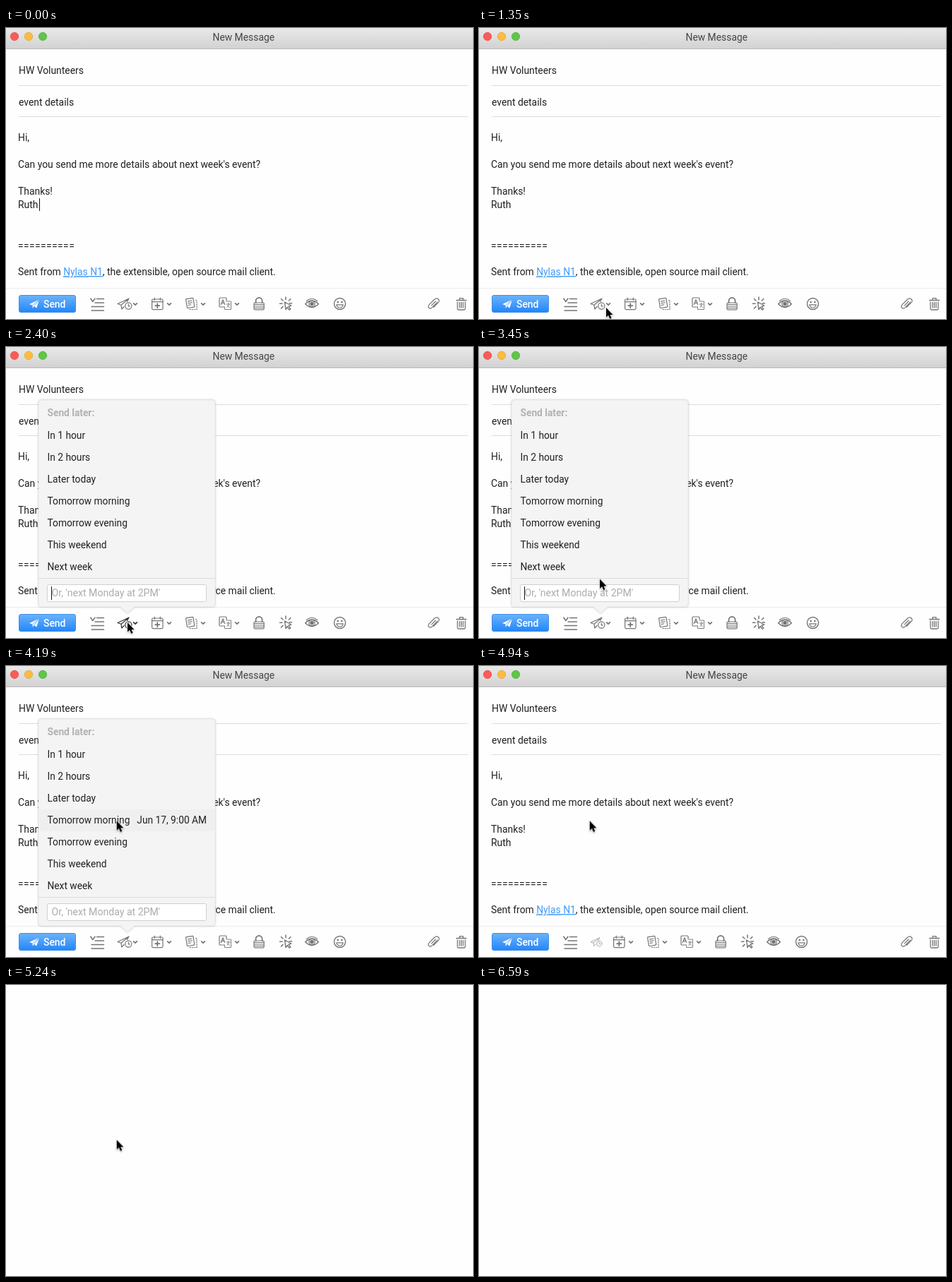
Recreate the animation shown at these times as an HTML page. Size 661 px wide and 412 px high, loop 7190 ms.

```html
<!DOCTYPE html>
<html lang="en">
<head>
<meta charset="utf-8">
<title>New Message</title>
<style>
  html, body { margin: 0; width: 100%; height: 100%; overflow: hidden; background: #fefefe; }
  svg { display: block; width: 661px; height: 412px; }
  text { font: 13.88px Roboto, "Open Sans", sans-serif; fill: #231f20; white-space: pre; }
  .rule { stroke: #dcdcdc; }
  .caret { stroke: #111; }
  .icon { color: #747474; fill: none; stroke: currentColor; stroke-width: 1.2; stroke-linecap: round; stroke-linejoin: round; }
  .solid { fill: currentColor; stroke: none; }
  .title { fill: #464646; text-anchor: middle; }
  .send { fill: #fff; font-weight: 500; }
  .link { fill: #419bf9; text-decoration: underline; text-decoration-color: #8fbfee; }
  .marks { letter-spacing: .4px; }
  #menu text { font-size: 13.75px; }
  #menu .heading { fill: #b2b2b2; font-weight: 700; }
  .hint { fill: #acacac; }
  .date { text-anchor: end; }
  .panel { filter: drop-shadow(0 .5px 1.5px rgba(0, 0, 0, .2)); }
  #pointer { filter: drop-shadow(0 1px 1px rgba(0, 0, 0, .3)); }

  /* Every part shares one 7190 ms clock and changes in hard steps. */
  .anim { animation: 7190ms step-end infinite; }
  #window { animation-name: window; }
  #bodyCaret { animation-name: bodyCaret; }
  #later { animation-name: later; }
  #laterSmall { animation-name: laterSmall; }
  #tools { animation-name: tools; }
  #menu { animation-name: menu; }
  #inputCaret { animation-name: inputCaret; }
  #weekend { animation-name: weekend; }
  #morning { animation-name: morning; }
  #veil { animation-name: veil; }
  #pointer { animation-name: pointer; }

  @keyframes window { 0% { opacity: 1 } 72.87%, 100% { opacity: 0 } }
  @keyframes bodyCaret {
    0%, 12.51%, 25.03% { opacity: 1 }
    4.17%, 18.77%, 29.2%, 100% { opacity: 0 }
  }
  @keyframes later {
    0%, 45.89% { color: #747474; visibility: visible }
    20.86% { color: #333; visibility: visible }
    68.7%, 100% { color: #747474; visibility: hidden }
  }
  @keyframes laterSmall { 0% { opacity: 0 } 68.7%, 100% { opacity: .65 } }
  @keyframes tools { 0% { transform: none } 68.7%, 100% { transform: translateX(-16px) } }
  @keyframes menu {
    0% { opacity: 0 } 31.29% { opacity: .55 }
    33.37% { opacity: 1 } 68.7%, 100% { opacity: 0 }
  }
  @keyframes inputCaret {
    0%, 47.98%, 66.61% { opacity: 1 }
    39.63%, 58.27%, 100% { opacity: 0 }
  }
  @keyframes weekend { 0% { opacity: 0 } 50.06% { opacity: 1 } 52.15%, 100% { opacity: 0 } }
  @keyframes morning { 0% { opacity: 0 } 52.15%, 100% { opacity: 1 } }
  @keyframes veil { 0% { opacity: 0 } 70.79%, 100% { opacity: .6 } }
  @keyframes pointer {
    0% { transform: translate(180px, 396px); opacity: 0 }
    18.77% { transform: translate(180px, 396px); opacity: 1 }
    20.86% { transform: translate(176px, 392.5px); opacity: 1 }
    22.94% { transform: translate(173px, 391px); opacity: 1 }
    25.03% { transform: translate(172px, 390px); opacity: 1 }
    45.89% { transform: translate(172px, 381.5px); opacity: 1 }
    47.98% { transform: translate(171px, 328.5px); opacity: 1 }
    50.06% { transform: translate(157px, 276px); opacity: 1 }
    52.15% { transform: translate(155.5px, 219px); opacity: 1 }
    54.1% { transform: translate(156.5px, 220px); opacity: 1 }
    58.27% { transform: translate(156.7px, 219.3px); opacity: 1 }
    89.56% { transform: translate(380px, 347.5px); opacity: 1 }
    91.65%, 100% { transform: translate(380px, 347.5px); opacity: 0 }
  }
</style>
</head>
<body>
<svg viewBox="0 0 661 412">
  <defs>
    <linearGradient id="bar" x2="0" y2="1"><stop stop-color="#e9e9e9"/><stop offset="1" stop-color="#d2d2d2"/></linearGradient>
    <linearGradient id="blue" x2="0" y2="1"><stop stop-color="#6bb3fb"/><stop offset="1" stop-color="#2386fa"/></linearGradient>
    <path id="chevron" d="M-2.4-1.2 0 1.2 2.4-1.2" stroke-width="1.7"/>
    <g id="plane">
      <path d="M171.5 387.5 174 383 158 390.5 163 392.3 174 383M163 392.3 163.8 398 167 394.5"/>
      <circle cx="173.3" cy="393.5" r="4.6"/>
      <path d="M173.3 391V393.8H175.3"/>
    </g>
  </defs>

  <g id="window" class="anim">
    <rect width="661" height="412" fill="#fefefe"/>
    <rect width="661" height="29" fill="url(#bar)"/>
    <path d="M0 29.5H661" stroke="#b9b9b9"/>
    <g stroke-width=".7">
      <circle cx="12" cy="12" r="5.7" fill="#fc5b57" stroke="#df4744"/>
      <circle cx="32" cy="12" r="5.7" fill="#fdbc40" stroke="#dfa033"/>
      <circle cx="52" cy="12" r="5.7" fill="#5fc646" stroke="#4dab38"/>
    </g>
    <text class="title" x="336.3" y="18">New Message</text>

    <text x="18" y="65">HW Volunteers</text>
    <text x="18" y="110">event details</text>
    <path class="rule" d="M18 81.5H654M18 125.5H654"/>

    <text x="17" y="160">Hi,</text>
    <text x="17" y="198">Can you send me more details about next week's event?</text>
    <text x="17" y="236">Thanks!</text>
    <text x="17" y="255">Ruth</text>
    <path id="bodyCaret" class="caret anim" d="M47.5 241V259"/>
    <text class="marks" x="17" y="313">==========</text>
    <text x="17" y="350">Sent from <tspan class="link">Nylas N1</tspan>, the extensible, open source mail client.</text>
    <path d="M81 353H116" stroke="#999" stroke-dasharray="1 1"/>

    <path d="M0 368.5H661" stroke="#ebebeb"/>
    <rect x="18.5" y="378.5" width="80" height="24" rx="2.5" fill="url(#blue)" stroke="#3d8fe6"/>
    <path d="M33 391 47 384.5 43.3 396.5 39.8 393.8 37.8 396.8 37.5 392.6Z" fill="#fff"/>
    <path d="M37.6 392.5 47 384.5 39.8 393.8" fill="none" stroke="#4d9ff9" stroke-width=".8"/>
    <text class="send" x="53" y="395.5">Send</text>

    <g class="icon">
      <path d="M119.8 383 122.8 387.5 126 383" stroke-width="1.5"/>
      <path d="M128.5 383.5H138.5M126 389H138.5M121 394.5H138.5M121 400H138.5" stroke-width="1.4"/>
      <g id="later" class="anim"><use href="#plane"/><use href="#chevron" x="183" y="391"/></g>
      <g id="laterSmall" class="anim"><use href="#plane" transform="translate(31.6 78.2) scale(.8)"/></g>

      <g id="tools" class="anim">
        <rect x="206.6" y="384" width="15.4" height="14.6" rx="1.5"/>
        <path d="M206.6 387.7H222M210.3 382V385.5M218.3 382V385.5"/>
        <path d="M214.3 390.2V396.2M211.3 393.2H217.3" stroke-width="1.8"/>
        <use href="#chevron" x="231" y="391"/>

        <g transform="rotate(-9 260 390)">
          <rect x="255.5" y="383" width="10.5" height="13" rx="1"/>
          <path d="M258 386.5H263.5M258 389.3H263.5M258 392H261.5"/>
        </g>
        <path d="M268.5 385.5H270V398.5H259.5V397.5" stroke-dasharray="1.4 1.9"/>
        <use href="#chevron" x="279" y="391"/>

        <path d="M312 386V383Q312 382 311 382H303Q302 382 302 383V394Q302 395 303 395H309"/>
        <path d="M304.3 391.5 307 384.8 309.7 391.5M305.2 389.3H308.8"/>
        <path d="M312 387H318.5V398.5H309.5V395M312.3 391H317M314.6 389.5V391M313 395.5 316.2 391.5M313.2 392.5 316.5 395.7" stroke-width=".9"/>
        <use href="#chevron" x="327" y="391"/>

        <path d="M353.6 389V386.3A4.5 4.5 0 0 1 362.6 386.3V389" stroke-width="1.7"/>
        <rect x="351" y="389" width="14.2" height="9.8" rx="1.2"/>
        <path d="M351.5 391.5H364.7M351.5 394H364.7M351.5 396.5H364.7" stroke-width="1.1"/>

        <path d="M394.5 388 403.8 393 399.9 394.2 402.8 398 401 399.2 398.2 395.4 396 398.6Z" stroke-width="1.4"/>
        <path d="M396 381V384.7M389.5 383.5 392 386M402.8 383.5 400.4 386M387.5 390.2H391M401.2 389.7H404.5M389.4 397 392 394.4" stroke-width="1.5"/>

        <path d="M423.7 390.8Q433 381.3 442.3 390.8Q433 400 423.7 390.8Z" stroke-width="1.6"/>
        <path d="M425.5 386.5Q433 380 440.5 386.5"/>
        <circle cx="433" cy="390.5" r="4.2"/>
        <circle class="solid" cx="433" cy="390.5" r="2.7"/>

        <circle cx="472.5" cy="390.5" r="8" stroke-width="1.4"/>
        <circle class="solid" cx="469.7" cy="388" r="1.3"/>
        <circle class="solid" cx="475.3" cy="388" r="1.3"/>
        <path d="M467.8 391.8H477.2Q476.2 396 472.5 396T467.8 391.8Z"/>
      </g>

      <path d="M610.5 388.2 603.2 395.7Q600.6 398.4 598.6 396.2T599.3 391.4L606.5 384.3Q609.6 381.7 612 384T611.5 389.2L605.3 395.3M608 387 602.3 392.8"/>
      <path d="M637.5 385.5H651.5M642 385.5V382.7H647V385.5M639 388V397.5Q639 399 640.5 399H648.5Q650 399 650 397.5V388M642 388.5V396M644.5 388.5V396M647 388.5V396" stroke-width="1.3"/>
    </g>

    <g id="menu" class="anim">
      <path class="panel" d="M50 75H292Q296 75 296 79V364Q296 368 292 368H182L172 377 162 368H50Q46 368 46 364V79Q46 75 50 75Z" fill="#f4f4f4" stroke="#d8d8d8" stroke-width=".5"/>
      <g id="weekend" class="anim">
        <rect x="46" y="265" width="250" height="31" fill="#efefef"/>
        <text class="date" x="284" y="285">Jun 18, 9:00 AM</text>
      </g>
      <g id="morning" class="anim">
        <rect x="46" y="203" width="250" height="31" fill="#efefef"/>
        <text class="date" x="284" y="223">Jun 17, 9:00 AM</text>
      </g>
      <text class="heading" x="58.5" y="98">Send later:</text>
      <text x="58.5" y="130">In 1 hour</text>
      <text x="58.5" y="161">In 2 hours</text>
      <text x="58.5" y="192">Later today</text>
      <text x="58.5" y="223">Tomorrow morning</text>
      <text x="58.5" y="254">Tomorrow evening</text>
      <text x="58.5" y="285">This weekend</text>
      <text x="58.5" y="316">Next week</text>
      <path class="rule" d="M46 327.5H296"/>
      <rect x="58.5" y="336.5" width="225" height="24" rx="2" fill="#fff" stroke="#d0d0d0"/>
      <text class="hint" x="64.5" y="353" style="font-size: 14.1px">Or, 'next Monday at 2PM'</text>
      <path id="inputCaret" class="caret anim" d="M64.5 339V358"/>
    </g>

    <rect id="veil" class="anim" y="213" width="661" height="199" fill="#fefefe"/>
  </g>

  <path id="pointer" class="anim" d="M0 0V13.6L3.1 10.8 5.2 15.7 7.6 14.7 5.5 9.9H9.6Z" stroke="#fff" stroke-width="1.2" paint-order="stroke"/>
</svg>
</body>
</html>
```
